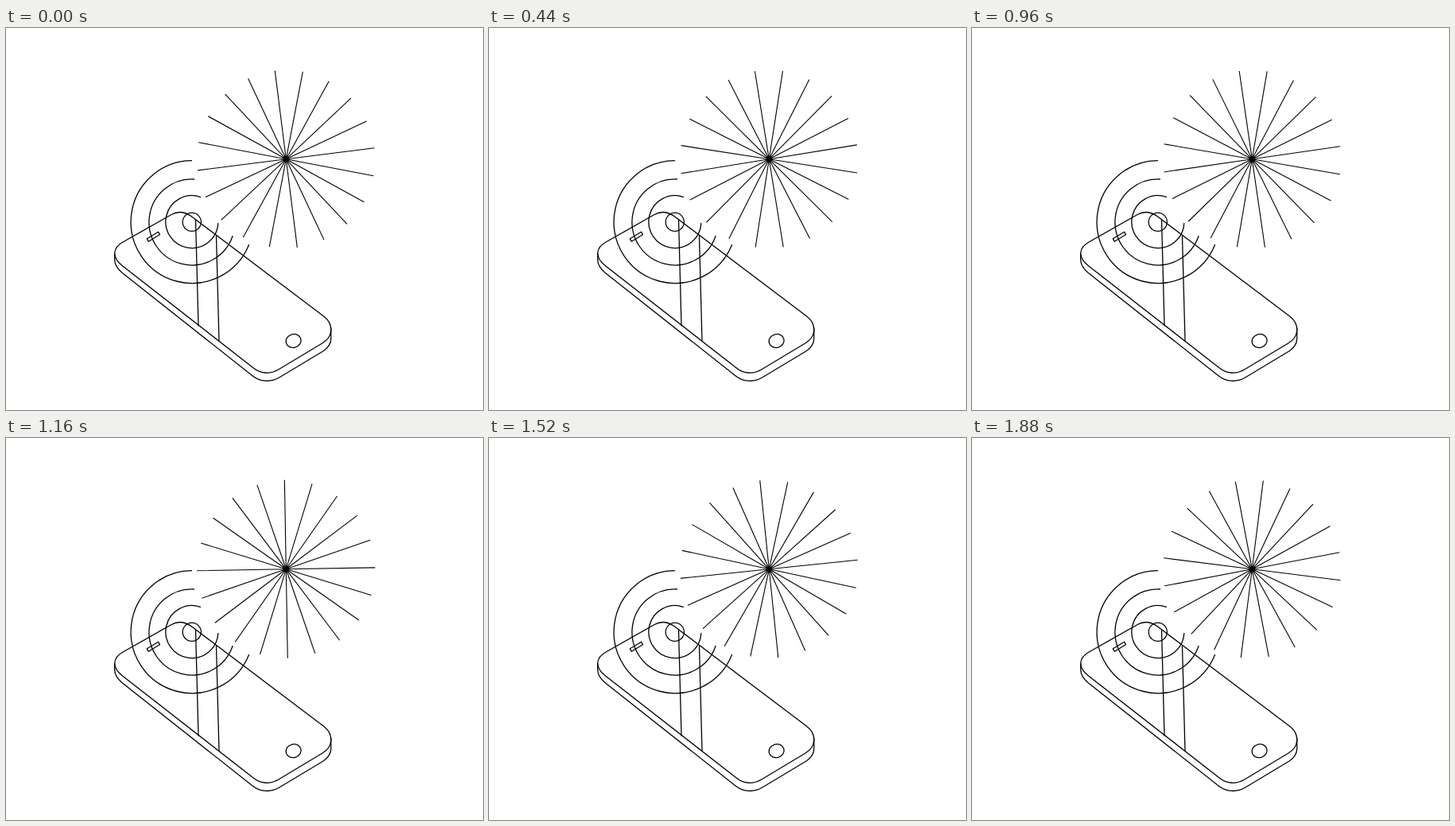
An HTML page that plays this animation: 600x480 px, repeating every 1.92 s.

```html
<!DOCTYPE html>
<html lang="en">
<head>
<meta charset="utf-8">
<title>Phone signal</title>
<style>
html, body { margin: 0; width: 100%; height: 100%; overflow: hidden; background: #fff; }
svg { display: block; }
</style>
</head>
<body>
<svg width="600" height="480" viewBox="0 0 600 480" fill="none" stroke="#000" stroke-width="1.3" stroke-linecap="round" stroke-linejoin="round">
  <!-- phone: top face, lower edge, glare, speaker, button -->
  <path d="M208 234.5L147 269C134.500 276 132.500 287.500 146 298.500L311 427C320 434.500 332 435.500 343 429L398 396C411.500 388 412.500 372.500 400 362.500L233 236.500C225 231 216 230 208 234.500Z"/>
  <path d="M136.700 284V291.500Q137 300 146 307.500L310 437C320 445 333 445.500 344 439L399 406Q408.800 399.500 408.800 390V377"/>
  <path d="M238.500 241L242 374M264.500 261.500L268 393"/>
  <path d="M177.300 264.800L191.500 256.200L193.500 259.500L179.300 268.200Z"/>
  <ellipse cx="361.600" cy="393.200" rx="9.600" ry="8.400" transform="rotate(-15 361.600 393.200)"/>
  <!-- signal -->
  <circle cx="233.800" cy="243.800" r="11.600"/>
  <path d="M244.500 212.300A33 33 0 1 0 266.800 245.500M236.500 190A54 54 0 1 0 285 261.500M233.500 166.700A77 77 0 1 0 305.500 272.500"/>
  <path id="rays" stroke-width="1.100" stroke-linecap="butt"/>
</svg>
<script>
const LOOP = 1920, STEP = 40, COUNT = 20, RADIUS = 112;
const rays = document.getElementById('rays');

let d = '';
for (let i = 0; i < COUNT; i++) {
  const a = i * 2 * Math.PI / COUNT;
  d += `M0 0L${RADIUS * Math.cos(a)} ${RADIUS * Math.sin(a)}`;
}
rays.setAttribute('d', d);

function draw(now) {
  const step = Math.floor(now % LOOP / STEP);
  rays.setAttribute('transform', `translate(352.3 164.8) rotate(${10.8 + step * 1.455})`);
}

const start = performance.now();
function tick() {
  draw(performance.now() - start);
  requestAnimationFrame(tick);
}
tick();
</script>
</body>
</html>
```
